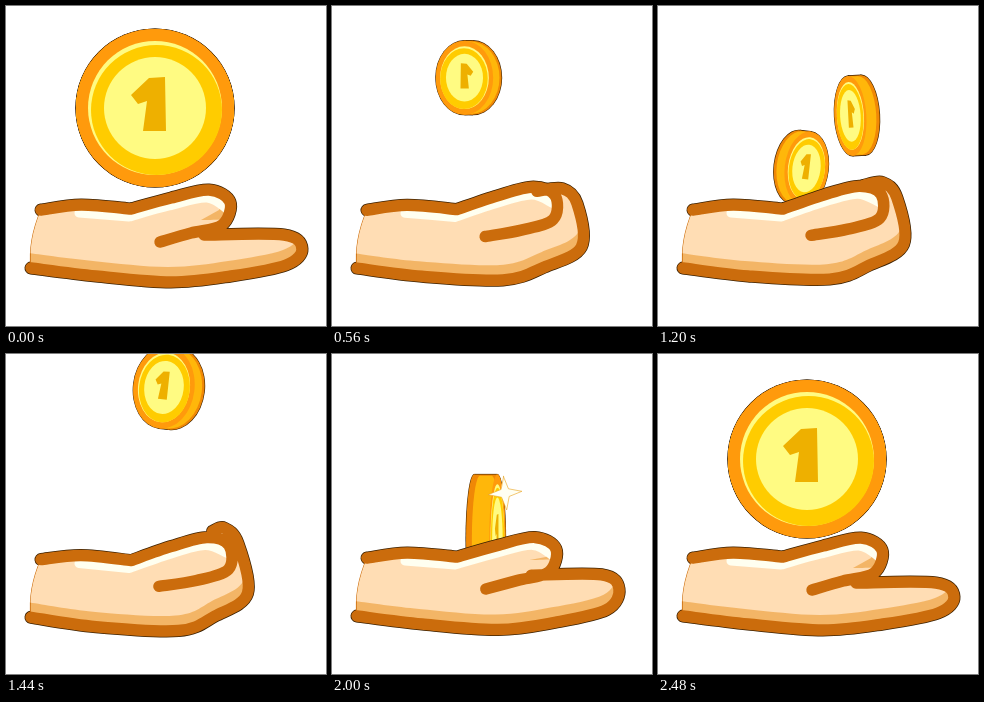
These frames come from a looping animation (320x320 px, 2560 ms). An HTML page with a canvas:

```html
<!DOCTYPE html>
<html lang="en">
<head>
<meta charset="utf-8">
<title>Coin toss</title>
<style>
html, body { margin: 0; width: 100%; height: 100%; overflow: hidden; background: #fff; }
canvas { display: block; width: 320px; height: 320px; }
</style>
</head>
<body>
<canvas id="stage" width="320" height="320"></canvas>
<script>
const ctx = document.getElementById('stage').getContext('2d');
const LOOP = 2560, STEP = 80, LANDED = 2000, GRAVITY = 0.0022, TAU = Math.PI * 2;
const INK = '#3b2000', BROWN = '#cb6c0c', SKIN = '#ffddb4', SHADE = '#f3b566', SHINE = '#fffff0';
const EDGE = '#f08806', RIM = '#ff9a0c', GOLD = '#ffcc00', PALE = '#fffb82', DIGIT = '#eeb000';

const clamp = v => Math.max(0, Math.min(1, v));
const lerp = (a, b, k) => a + (b - a) * k;
const smooth = k => k * k * (3 - 2 * k);
const ramp = (t, from, to) => smooth(clamp((t - from) / (to - from)));
const bump = (t, peak, reach) => Math.cos(Math.min(1, Math.abs(t - peak) / reach) * TAU / 4) ** 2;
const easeOut = k => 1 - (1 - k) ** 3;
const backOut = k => 1 + 2.7 * (k - 1) ** 3 + 1.7 * (k - 1) ** 2;

// Every throw is a parabola; x and spin are given at its peak, radius grows from r0 to r1.
const throws = [
  { from: 80, to: 320, peak: 240, top: 30, x: 153, vx: 0.025, r0: 78, r1: 29, spin: 232, rate: 0.97, tilt: 0 },
  { from: 400, to: 880, peak: 633, top: 60, x: 144, vx: 0.1, r0: 38, r1: 35, spin: 208, rate: 0.92, tilt: 0 },
  { from: 800, to: 1200, peak: 1050, top: 60, x: 163, vx: 0.24, r0: 45, r1: 40, spin: 331, rate: 0.95, tilt: -0.06 },
  { from: 1200, to: 1600, peak: 1441, top: 34, x: 163, vx: 0.0825, r0: 37, r1: 44, spin: 319, rate: 1.1, tilt: 0.12 },
  { from: 1600, to: LANDED, peak: 1780, top: 79, x: 145, vx: 0.04, r0: 38, r1: 65, spin: 236, rate: 0.94, tilt: 0 }
];
const sparkles = [{ peak: 880, x: 121, y: 86, size: 12 }, { peak: LANDED, x: 173, y: 139, size: 17 }];

const openHand = {
  thumb: [[165, 192], [203, 184], [224, 196], [216, 219], [185, 227], [154, 236]],
  finger: [[198, 229], [278, 229], [296, 243], [280, 259], [225, 270], [165, 276]]
};
const fist = {
  thumb: [[165, 189], [201, 180], [223, 188], [222, 212], [190, 223], [153, 229]],
  finger: [[206, 177], [222, 174], [236, 189], [244, 237], [210, 259], [172, 273]]
};

const curlAt = t => 0.15 * ramp(t, 80, 320) + 0.7 * ramp(t, 360, 560) + 0.25 * ramp(t, 880, 1600)
  - 0.95 * ramp(t, 1640, LANDED) - 0.15 * ramp(t, LANDED, 2160);

// A deep dip winds up the first toss, small ones absorb the catches.
function dropAt(t) {
  let drop = 24 * bump(t, 240, 230) - 4 * bump(t, 1600, 200);
  for (let i = 0; i < 4; i++) drop += 5 * bump(t, 680 + 360 * i, 150);
  return drop;
}

function addCurve(path, pts, join) {
  if (join) path.lineTo(...pts[0]); else path.moveTo(...pts[0]);
  for (let i = 0; i < pts.length - 1; i++) {
    const p = pts[Math.max(0, i - 1)], a = pts[i], b = pts[i + 1], n = pts[Math.min(pts.length - 1, i + 2)];
    path.bezierCurveTo(a[0] + (b[0] - p[0]) / 6, a[1] + (b[1] - p[1]) / 6,
      b[0] - (n[0] - a[0]) / 6, b[1] - (n[1] - a[1]) / 6, b[0], b[1]);
  }
}

function stroke(path, color, width) {
  ctx.strokeStyle = color;
  ctx.lineWidth = width;
  ctx.stroke(path);
}

function fillShifted(path, color, dx, dy) {
  ctx.save();
  ctx.translate(dx, dy);
  ctx.fillStyle = color;
  ctx.fill(path);
  ctx.restore();
}

function drawHand(t) {
  const curl = curlAt(t), drop = dropAt(t);
  // The wrist stays, so the drop fades towards the left.
  const sink = ([x, y]) => [x, y + drop * clamp(0.2 + x / 170)];
  const part = name => openHand[name].map(([x, y], i) =>
    sink([lerp(x, fist[name][i][0], curl), lerp(y, fist[name][i][1], curl)]));
  const wrist = [[35, 204], [75, 199], [125, 203]].map(sink);
  const thumb = [wrist[2], ...part('thumb')];
  const finger = [...part('finger'), ...[[90, 270], [25, 262]].map(sink)];

  const lines = new Path2D();
  addCurve(lines, wrist);
  addCurve(lines, thumb, true);
  addCurve(lines, finger);
  const body = new Path2D();
  addCurve(body, wrist);
  addCurve(body, thumb.slice(0, 5), true);
  addCurve(body, finger, true);
  body.quadraticCurveTo(22, 235, ...wrist[0]);
  const shine = new Path2D();
  addCurve(shine, wrist.slice(1));
  addCurve(shine, thumb.slice(0, 4), true);

  ctx.lineJoin = ctx.lineCap = 'round';
  stroke(lines, INK, 13);
  stroke(body, BROWN, 1.2);
  ctx.save();
  ctx.clip(body);
  fillShifted(body, SHADE, 0, 0);
  fillShifted(body, SKIN, -3, -15);
  ctx.translate(-2, 8);
  stroke(shine, SHINE, 9);
  ctx.restore();
  stroke(lines, BROWN, 11.5);
}

function oval(x, y, rx, ry, color) {
  ctx.fillStyle = color;
  ctx.beginPath();
  ctx.ellipse(x, y, rx, ry, 0, 0, TAU);
  ctx.fill();
}

function slab(half, rx, ry, color) {
  oval(-half, 0, rx, ry, color);
  oval(half, 0, rx, ry, color);
  ctx.fillRect(-half, -ry, half * 2, ry * 2);
}

function drawCoin({ x, y, r, spin, tilt }) {
  const angle = spin * TAU / 360, c = Math.cos(angle);
  const front = 0.18 * r * Math.sin(angle) * Math.sign(c), half = Math.abs(front), rx = r * Math.abs(c);
  ctx.save();
  ctx.translate(x, y);
  ctx.rotate(tilt);
  slab(half, rx + 0.6, r + 0.6, INK);
  slab(half, rx, r, EDGE);
  slab(half * 0.5, rx, r * 0.98, '#ffb70a');
  ctx.translate(front, 0);
  ctx.scale(c * r / 79, r / 79);
  oval(0, 0, 79, 79, RIM);
  oval(0, 0, 67, 67, PALE);
  oval(1.5, 2, 65.5, 65, GOLD);
  oval(0, 0, 51, 51, PALE);
  ctx.fillStyle = DIGIT;
  ctx.beginPath();
  [[-6, -30], [10, -31], [11, 23], [-12, 23], [-8, -7], [-17, -4], [-24, -13]]
    .forEach(p => ctx.lineTo(...p));
  ctx.fill();
  ctx.restore();
}

function drawThrow(flight, t) {
  const age = t - flight.peak, y = flight.top + GRAVITY * age * age;
  if (t < flight.from || y > 240) return;
  drawCoin({
    x: flight.x + flight.vx * age, y,
    r: lerp(flight.r0, flight.r1, clamp((t - flight.from) / (flight.to - flight.from))),
    spin: flight.spin + flight.rate * age, tilt: flight.tilt
  });
}

// The last coin springs up out of the hand, turns to the front and settles.
function drawRisingCoin(t) {
  const k = clamp((t - LANDED) / 480), turn = easeOut(clamp(k * 2));
  drawCoin({
    x: lerp(154, 149, k), y: lerp(190, 105, backOut(k)),
    r: lerp(65, 79, turn), spin: lerp(83, 0, turn), tilt: 0
  });
}

function drawSparkle({ peak, x, y, size }, t) {
  const k = 1 - Math.abs(t - peak) / 200;
  if (k <= 0) return;
  ctx.beginPath();
  for (let i = 0; i < 8; i++) {
    const a = i * TAU / 8 - TAU / 4 - 0.1, d = size * k * (i % 2 ? 0.32 : 1);
    ctx.lineTo(x + Math.cos(a) * d, y + Math.sin(a) * d);
  }
  ctx.closePath();
  ctx.fillStyle = '#fffff2';
  ctx.fill();
  ctx.strokeStyle = '#e9a11a';
  ctx.lineWidth = 0.6;
  ctx.stroke();
}

function render(now) {
  const t = Math.floor(now % LOOP / STEP) * STEP;
  ctx.fillStyle = '#fff';
  ctx.fillRect(0, 0, 320, 320);
  if (t < throws[0].from) drawCoin({ x: 149, y: 102, r: 79, spin: 0, tilt: 0 });
  else if (t > LANDED) drawRisingCoin(t);
  else for (const flight of [...throws].reverse()) drawThrow(flight, t);
  sparkles.forEach(s => drawSparkle(s, t));
  drawHand(t);
}

const start = performance.now();
function tick() {
  render(performance.now() - start);
  requestAnimationFrame(tick);
}
tick();
</script>
</body>
</html>
```
